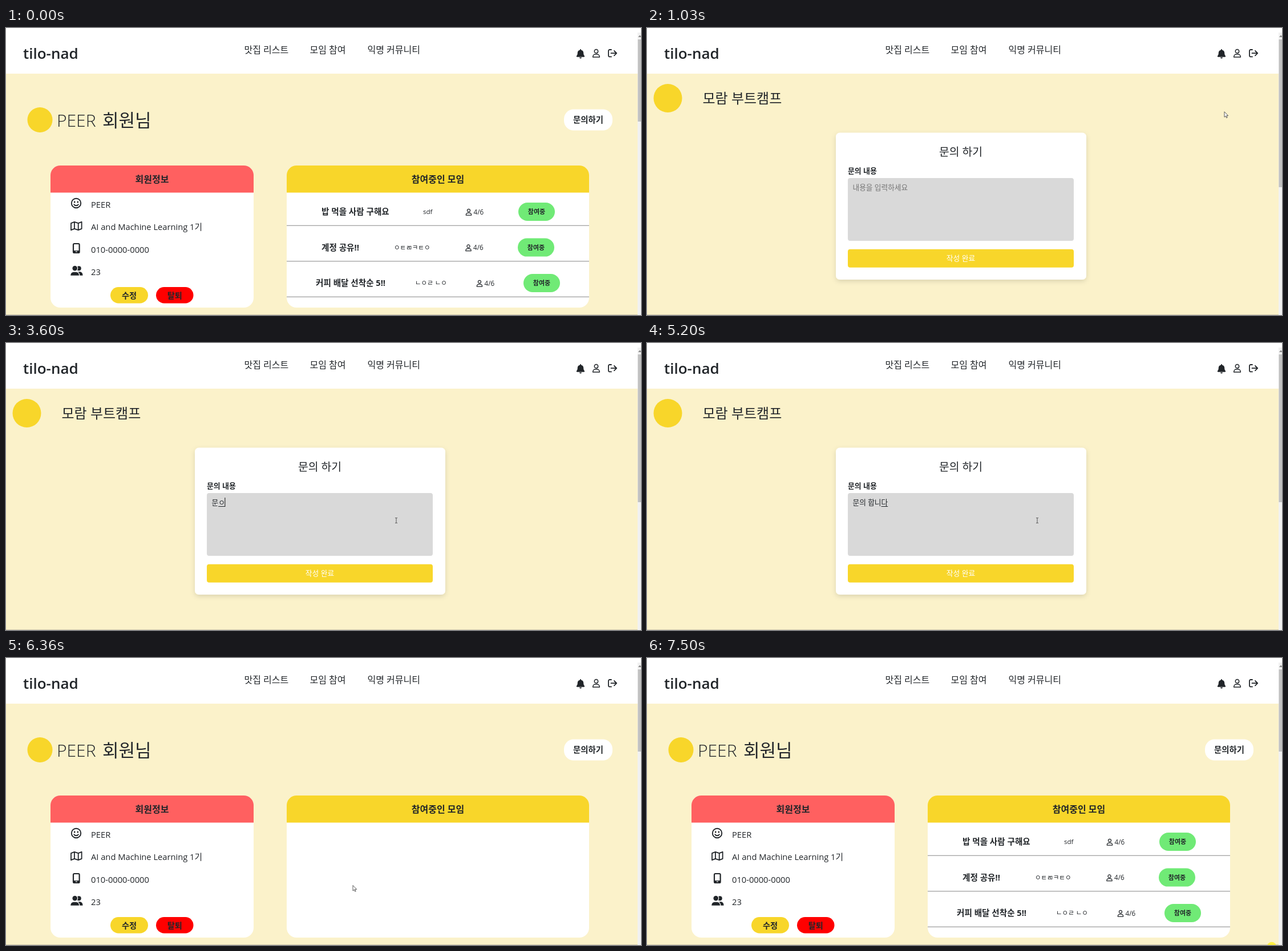
These frames come from a looping animation (1113 px wide and 503 px high, 7.58 s). An HTML page:

```html
<!DOCTYPE html>
<html lang="ko">
<head>
<meta charset="utf-8">
<style>
html, body { margin: 0; width: 100%; height: 100%; overflow: hidden; background: #fbf2ca; }
svg { display: block; width: 100vw; height: 100vh; }
text { font-family: 'Open Sans', 'Noto Sans CJK KR', 'Noto Sans CJK', sans-serif; fill: #212529; white-space: pre; }
.line { fill: none; stroke: #212529; stroke-linejoin: round; stroke-linecap: round; }
</style>
</head>
<body>
<svg id="stage" viewBox="0 0 1113 503"></svg>
<script>
const LOOP = 7580;
const YELLOW = '#f8d62a', INK = '#212529';

const text = (x, y, size, str, { w = 400, fill = INK, anchor = 'start' } = {}) =>
  `<text x="${x}" y="${y}" font-size="${size}" font-weight="${w}" text-anchor="${anchor}" style="fill:${fill}">${str}</text>`;
const bold = (x, y, size, str) => text(x, y, size, str, { w: 700 });
const boldMid = (x, y, size, str) => text(x, y, size, str, { w: 700, anchor: 'middle' });
const box = (x, y, w, h, r, fill) =>
  `<rect x="${x}" y="${y}" width="${w}" height="${h}" rx="${r}" fill="${fill}"/>`;
const at = (x, y, body, scale = 1) => `<g transform="translate(${x} ${y}) scale(${scale})">${body}</g>`;

const person = `<g class="line" stroke-width="1.5"><circle cy="-3.7" r="3.2"/>
  <path d="M-5.9 6.6C-5.9 3.2-3.6 1.6-1.4 1.6H1.4C3.6 1.6 5.9 3.2 5.9 6.6Z"/></g>`;
const bell = `<path fill="${INK}" d="M0-8a1 1 0 0 1 1 1v.6c2.6.5 4.2 2.6 4.2 5 0 3 .8 4.3 1.8 5.5.5.7 0 1.6-.8 1.6h-12.4c-.8 0-1.3-.9-.8-1.6 1-1.2 1.8-2.5 1.8-5.5 0-2.4 1.6-4.5 4.2-5v-.6a1 1 0 0 1 1-1zM-2 6.4h4a2 2 0 0 1-4 0z"/>`;
const exit = `<path class="line" stroke-width="1.8" d="M-2-6.2h-3a2 2 0 0 0-2 2v8.4a2 2 0 0 0 2 2h3M-2.5 0h9.5M3 -4.2L7.2 0 3 4.2"/>`;
const smile = `<g class="line" stroke-width="1.9"><circle r="8.2"/><path d="M-3.8 2.2c1.8 2.8 5.8 2.8 7.6 0"/></g>
  <circle cx="-2.8" cy="-2" r="1.3"/><circle cx="2.8" cy="-2" r="1.3"/>`;
const map = `<path class="line" stroke-width="1.8" d="M-9.3-4.8L-3.4-7.2 3.4-4.8 9.3-7.2V4.8L3.4 7.2-3.4 4.8-9.3 7.2ZM-3.4-7.2V4.8M3.4-4.8V7.2"/>`;
const phone = `<rect class="line" stroke-width="2.2" x="-5.3" y="-8" width="10.6" height="16" rx="1.8"/>
  <path fill="${INK}" d="M-5 4H5V8H-5Z"/><path stroke="#fff" stroke-width="1.2" d="M-1.5 6H1.5"/>`;
const people = `<g fill="${INK}"><circle cx="4.2" cy="-4.2" r="4"/><path d="M3 8.3V1.8H6C8.8 1.8 11 4 11 8.3Z"/>
  <g stroke="#fff" stroke-width="1.2"><circle cx="-2.8" cy="-4.4" r="4.9"/>
  <path d="M-11 8.9C-11 4-8 1.6-5 1.6H-.6C2.4 1.6 5.4 4 5.4 8.9Z"/></g></g>`;

function headerBar() {
  return box(0, 0, 1113, 80, 0, '#fff')
    + text(30, 54, 26, 'tilo-nad', { w: 600 })
    + text(417.5, 44, 16, '맛집 리스트') + text(532.5, 44, 16, '모임 참여') + text(633.5, 44, 16, '익명 커뮤니티')
    + at(1007, 45, bell) + at(1034.5, 44.5, person) + at(1063, 44.2, exit)
    + box(1107, 8, 6, 495, 0, '#f1f1f1')
    + '<path fill="#8a8a8a" d="M1108 16l3-3.5 3 3.5z"/>'
    + '<rect id="thumb" x="1107.5" y="20" width="5.5" fill="#c1c1c1"/>';
}

function card(x, w, fill, title) {
  return box(x, 241, w, 249, 17, '#fff')
    + `<path fill="${fill}" d="M${x} 288.5V258a17 17 0 0 1 17-17h${w - 34}a17 17 0 0 1 17 17V288.5z"/>`
    + boldMid(x + w / 2, 270.7, 16, title);
}

function meeting(y, [titleX, title], [hostX, host], countX, pillX) {
  return bold(titleX, y + 5, 14.6, title)
    + text(hostX, y + 4.2, 11.5, host)
    + at(countX + 6, y + 0.8, person, 0.8) + text(countX + 14.5, y + 4.7, 11.7, '4/6')
    + box(pillX, y - 16, 64, 32, 16, '#70ea76') + boldMid(pillX + 32, y + 4.2, 11, '참여중')
    + box(492, y + 23.7, 530, 1, 0, '#868686');
}

function profilePage() {
  return `<circle cx="59.5" cy="161" r="22" fill="${YELLOW}"/>`
    + text(89, 173, 30, 'PEER', { w: 350 }) + text(169, 173, 31, '회원님', { w: 350 })
    + box(978, 142.5, 85, 37, 17, '#fff') + boldMid(1020.5, 166.3, 14.4, '문의하기')
    + card(78, 356, '#ff6060', '회원정보')
    + at(123, 307, smile) + text(149, 315, 14.7, 'PEER')
    + at(123.3, 347, map) + text(149, 354, 14.7, 'AI and Machine Learning 1기')
    + at(123.3, 386, phone) + text(149, 394, 14.7, '010-0000-0000')
    + at(123.5, 425.5, people) + text(149, 433, 14.7, '23')
    + box(183, 454, 66, 28.5, 14.2, YELLOW) + boldMid(216, 473.5, 14.2, '수정')
    + box(263, 454, 65.5, 28.5, 14.2, '#f00') + boldMid(295.7, 473.5, 14.2, '탈퇴')
    + card(492, 530, YELLOW, '참여중인 모임')
    + '<g id="meetings">'
    + meeting(322, [553, '밥 먹을 사람 구해요'], [731, 'sdf'], 805, 898)
    + meeting(384.6, [553, '계정 공유!!'], [680, 'ㅇㅌㄻㅋㅌㅇ'], 804.5, 897)
    + meeting(447, [543, '커피 배달 선착순 5!!'], [717, 'ㄴㅇㄹ ㄴㅇ'], 824, 907)
    + '</g>';
}

function formPage() {
  return `<circle cx="36.5" cy="123" r="25" fill="${YELLOW}"/>`
    + text(97.5, 132.3, 24, '모람 부트캠프', { w: 350 })
    + `<g filter="url(#shadow)">${box(331, 183.5, 439, 257.5, 7, '#fff')}</g>`
    + text(550, 224, 19.3, '문의 하기', { anchor: 'middle' })
    + bold(352, 254.8, 12.9, '문의 내용')
    + box(352, 263, 396, 110, 4, '#d9d9d9')
    + '<text id="entry" x="360.5" y="284.3" font-size="12.7"></text>'
    + `<rect id="under" y="286" width="11.7" height="1" fill="${INK}"/>`
    + '<rect id="caret" y="271" width="1" height="16" fill="#111"/>'
    + box(352, 387.7, 396, 32, 4, YELLOW)
    + text(550, 408.2, 12.8, '작성 완료', { fill: '#fff', anchor: 'middle' });
}

const $ = id => document.getElementById(id);
$('stage').innerHTML = `<defs><filter id="shadow" x="-10%" y="-10%" width="120%" height="125%">
  <feDropShadow dx="0" dy="3" stdDeviation="4" flood-opacity=".13"/></filter></defs>
  ${box(0, 0, 1113, 503, 0, '#fbf2ca')}${headerBar()}
  <g id="profile">${profilePage()}</g><g id="form">${formPage()}</g>
  ${box(0, 502, 1107, 1, 0, '#cfc9ae')}
  <g id="mouse"><circle id="halo" r="8.2" fill="#ffee10" opacity=".72"/>
  <g fill="#fff" stroke="#333" stroke-width=".8" stroke-linejoin="round">
  <path id="arrow" d="M0 0v9.5l2.2-2 1.5 3.3 1.5-.7-1.5-3.2h3z"/>
  <path id="hand" d="M-1.2 1a1.1 1.1 0 0 1 2.2 0v4l4 .8c1.2.3 1.7 1 1.6 2l-.6 3.6-.8 2.1h-5l-3.6-4.8c-.5-.8.5-1.6 1.2-1.1l1 .9z"/>
  <path id="beam" fill="none" d="M-2-4.5h1.4L0-4 .6-4.5H2M0-4V4M-2 4.5h1.4L0 4 .6 4.5H2"/></g></g>`;

// time, x, y of the pointer tip
const track = [
  [130, 1098, 504], [330, 1088, 400], [560, 1040, 210], [700, 1014, 128], [820, 1012, 146],
  [1100, 1012, 147], [1380, 1016, 239], [2040, 1016, 239], [2280, 920, 345], [2470, 800, 386],
  [2700, 684, 311], [5399, 684, 311], [5400, 684, 304], [5600, 684, 304], [5850, 655, 350],
  [6160, 608, 398.5], [6620, 608, 398.5], [6850, 730, 424], [7060, 920, 470], [7240, 1064, 515],
  [7499, 1064, 515], [7500, 1095, 506], [LOOP, 1095, 506]
];
const haloSpans = [[130, 1030], [1100, 2700], [5700, 6360], [6650, LOOP]];

// time, typed text, composing flag
const typing = [
  [3120, 'ㅁ', 1], [3330, '무', 1], [3470, '문', 1], [3600, '문ㅇ', 1], [3670, '문으', 1], [3740, '문의', 1],
  [3940, '문의 ', 0], [4010, '문의 ㅎ', 1], [4150, '문의 하', 1], [4210, '문의 합', 1], [4410, '문의 합ㄴ', 1],
  [4470, '문의 합니', 1], [4610, '문의 합니ㄷ', 1], [4670, '문의 합니다', 1], [6100, '문의 합니다', 0]
];

const show = (id, on) => { $(id).style.display = on ? '' : 'none'; };
const inside = ([x, y], l, t, r, b) => x >= l && x <= r && y >= t && y <= b;
const within = (t, [a, b]) => t >= a && t < b;

function pointerAt(t) {
  const i = track.findIndex(p => p[0] > t);
  if (i < 1) return track[i < 0 ? track.length - 1 : 0].slice(1);
  const [t0, x0, y0] = track[i - 1], [t1, x1, y1] = track[i];
  const k = (t - t0) / (t1 - t0);
  return [x0 + (x1 - x0) * k, y0 + (y1 - y0) * k];
}

function drawMouse(t, onForm) {
  const p = pointerAt(t);
  const beam = onForm && inside(p, 352, 263, 748, 373);
  const hand = onForm ? inside(p, 352, 388, 748, 420) : t < 1030 && inside(p, 978, 143, 1063, 180);
  show('mouse', t >= 130);
  $('mouse').setAttribute('transform', `translate(${p[0]} ${p[1]})`);
  show('halo', haloSpans.some(s => within(t, s)));
  show('beam', beam);
  show('hand', hand);
  show('arrow', !beam && !hand);
}

function drawEntry(t) {
  const [, str, composing] = typing.filter(k => k[0] <= t).pop() || [0, '', 0];
  const entry = $('entry');
  entry.textContent = str || '내용을 입력하세요';
  entry.style.fill = str ? INK : '#757575';
  const spaces = str.split(' ').length - 1;
  const end = 360.5 + (str.length - spaces) * 11.68 + spaces * 3.3;
  $('under').setAttribute('x', end - 11.7);
  $('caret').setAttribute('x', end - 0.5);
  show('under', composing);
  show('caret', within(t, [2700, 5200]));
}

function draw(t) {
  const onForm = within(t, [1030, 6360]);
  show('form', onForm);
  show('profile', !onForm);
  show('meetings', !within(t, [6360, 6420]));
  $('thumb').setAttribute('height', onForm ? 259 : 144);
  if (onForm) drawEntry(t);
  drawMouse(t, onForm);
}

const start = performance.now();
function tick() {
  draw((performance.now() - start) % LOOP);
  requestAnimationFrame(tick);
}
tick();
</script>
</body>
</html>
```
